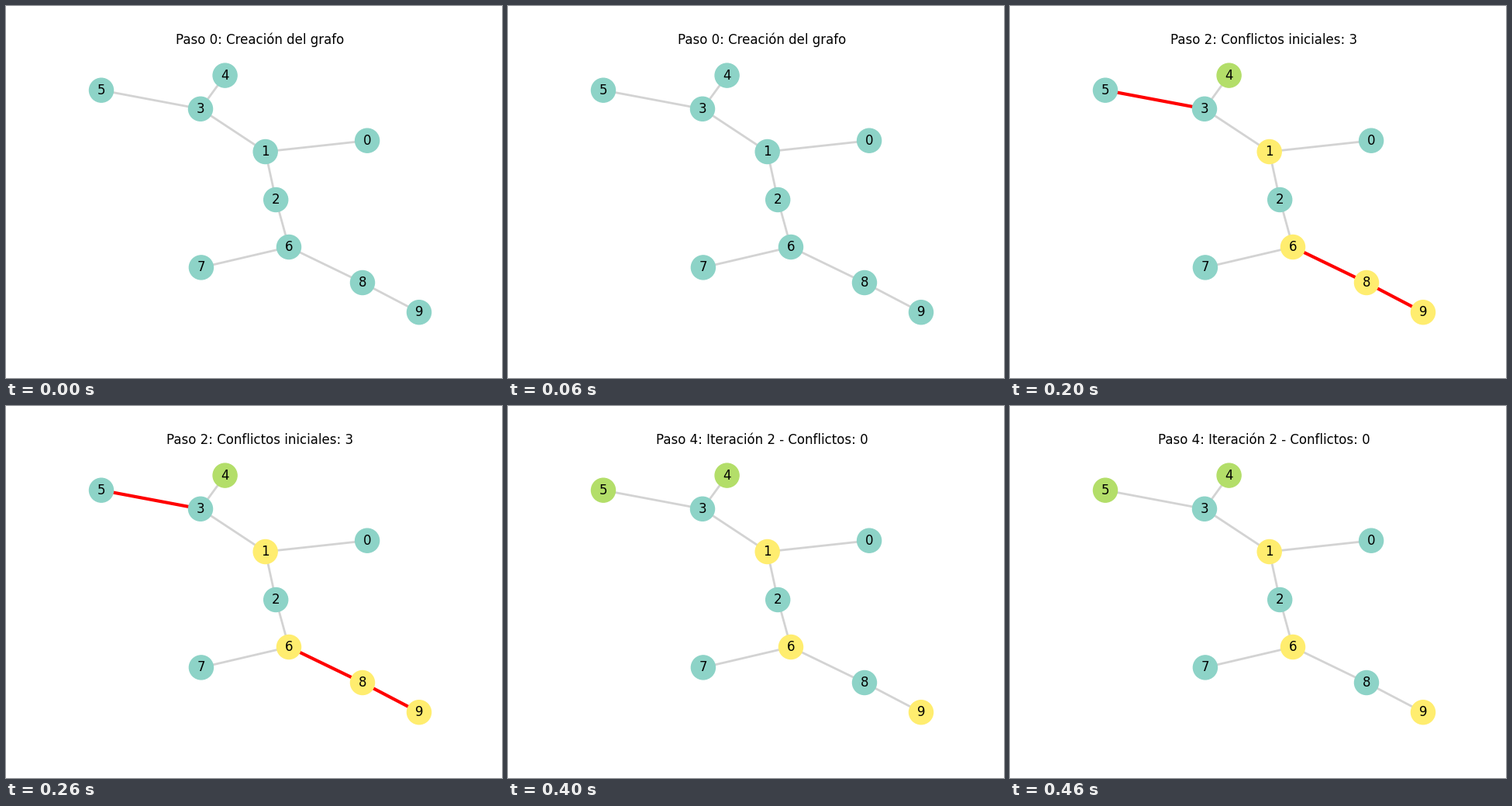
Write a matplotlib script that moves like this. It is 640 px wide and 480 px high and loops after 500 ms.

```python
import matplotlib.pyplot as plt
from matplotlib.animation import FuncAnimation
from matplotlib.collections import LineCollection

PALETTE = plt.get_cmap("Set3")([0.0, 0.5, 1.0])
EDGES = [(int(a), int(b)) for a, b in "01 12 13 26 34 35 67 68 89".split()]
START = [int(c) for c in "0200102022"]

# Node centres in pixels, measured from the top left corner.
NODES = [
    (466.1, 173.7), (334.7, 188.0), (348.2, 250.0), (251.0, 132.8),
    (282.6, 89.6), (123.0, 108.7), (365.0, 311.0), (251.9, 337.4),
    (460.0, 357.0), (533.0, 395.2),
]


def conflicts(colors):
    return [(a, b) for a, b in EDGES if colors[a] == colors[b]]


def repair(colors):
    """Give the node with most conflicts the first colour its neighbours lack."""
    ends = [n for edge in conflicts(colors) for n in edge]
    worst = max(ends, key=lambda n: (ends.count(n), n))
    near = {colors[a + b - worst] for a, b in EDGES if worst in (a, b)}
    free = next(c for c in range(len(PALETTE)) if c not in near)
    return [free if n == worst else c for n, c in enumerate(colors)]


def build_steps():
    """List the title, node colours and marked edges of every step."""
    colors, clash = START, conflicts(START)
    steps = [
        ("Creación del grafo", [0] * len(NODES), []),
        ("Asignación aleatoria de colores", colors, clash),
        (f"Conflictos iniciales: {len(clash)}", colors, clash),
    ]
    turn = 0
    while clash:
        turn += 1
        colors = repair(colors)
        clash = conflicts(colors)
        label = f"Iteración {turn} - Conflictos: {len(clash)}"
        steps.append((label, colors, clash))
    return steps


STEPS = build_steps()

fig = plt.figure(figsize=(6.4, 4.8), dpi=100)
ax = fig.add_axes([0.125, 0.11, 0.775, 0.77])
ax.set_xlim(80, 576)
ax.set_ylim(427.2, 57.6)
ax.axis("off")

title = ax.set_title("", fontsize=12)
lines = LineCollection([(NODES[a], NODES[b]) for a, b in EDGES], zorder=1)
ax.add_collection(lines, autolim=False)
dots = ax.scatter(*zip(*NODES), s=500, zorder=2, clip_on=False)
for n, (x, y) in enumerate(NODES):
    ax.text(x, y, str(n), fontsize=12, ha="center", va="center", zorder=3)


def draw(step):
    label, colors, clash = STEPS[step]
    title.set_text(f"Paso {step}: {label}")
    dots.set_facecolor(PALETTE[colors])
    dots.set_edgecolor("face")
    lines.set_color(["red" if e in clash else "lightgray" for e in EDGES])
    lines.set_linewidth([3 if e in clash else 2 for e in EDGES])
    return title, lines, dots


anim = FuncAnimation(fig, draw, frames=len(STEPS), interval=100, repeat=True,
                     repeat_delay=0, init_func=lambda: draw(0))
plt.show()
```
